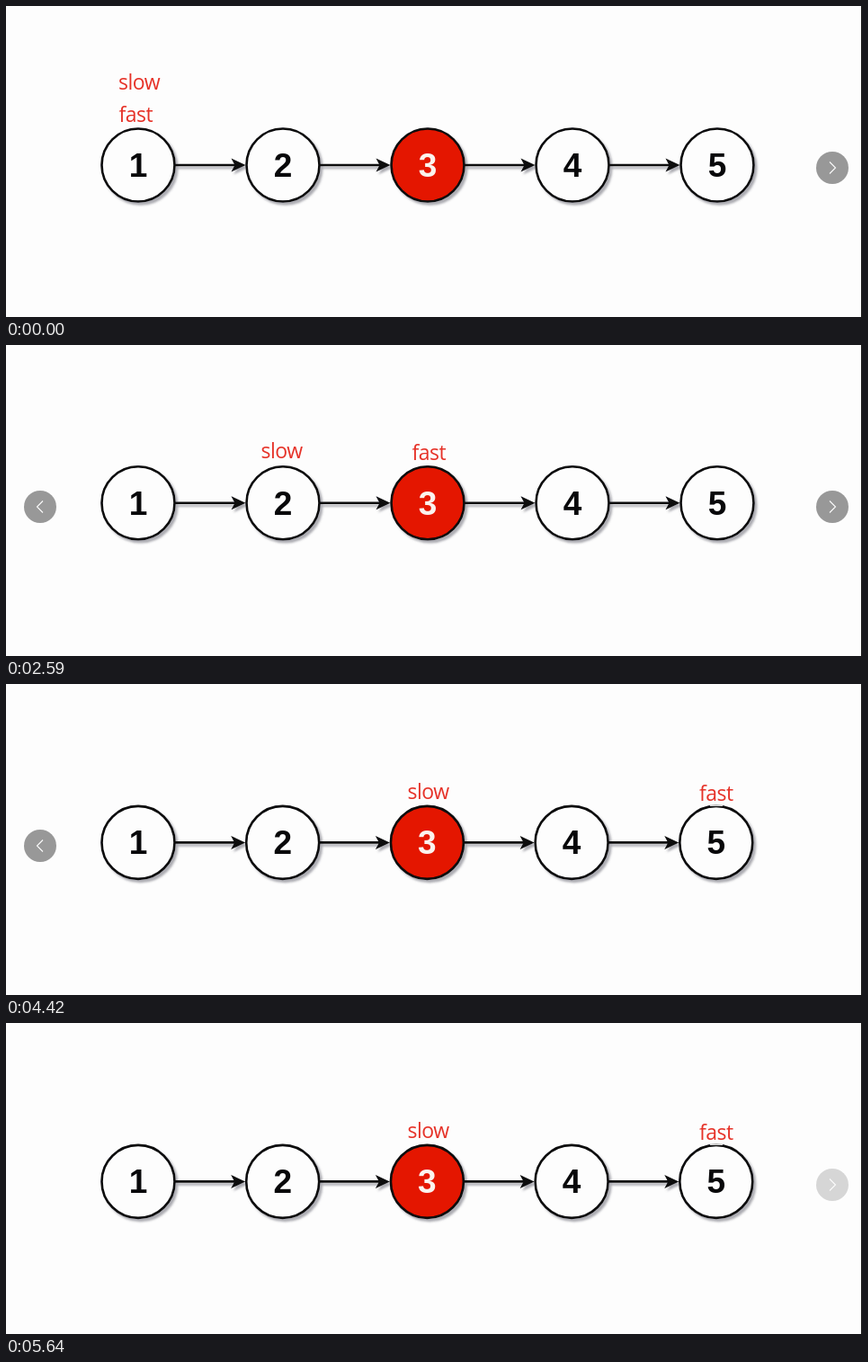
Write an HTML page that moves like this. It is 952 by 346 pixels and loops after 6.36 s.

```html
<!DOCTYPE html>
<html lang="en">
<head>
<meta charset="utf-8">
<style>
  html, body { margin: 0; width: 100%; height: 100%; overflow: hidden; background: #fdfdfd; }
  svg { display: block; }
  .num { font: bold 37px "Liberation Sans", Arial, sans-serif; text-anchor: middle; }
  .label { font: 23px "Open Sans", "Noto Sans", sans-serif; letter-spacing: -.5px; fill: #e63228; }
</style>
</head>
<body>
<svg width="952" height="346" viewBox="0 0 952 346">
  <defs>
    <filter id="shadow" filterUnits="userSpaceOnUse" x="90" y="120" width="760" height="115">
      <feDropShadow dx="2.7" dy="3" stdDeviation="1" flood-color="#5c5c68" flood-opacity=".5"/>
    </filter>
  </defs>
  <g id="slides"></g>
  <g id="buttons"></g>
  <path d="M951.5 0V346" stroke="#111"/>
</svg>
<script>
const LOOP = 6360, R = 40.5, INK = '#08080a';

// Each slide: centre line, node spacing, and labels as [text, x, baseline].
const slides = [
  { y: 177, gap: 161, labels: [['slow', 125, 93], ['fast', 125.5, 129]] },
  { y: 175.7, gap: 161, labels: [['slow', 283.5, 126], ['fast', 451.5, 128]] },
  { y: 176.4, gap: 160.7, labels: [['slow', 446.5, 127.5], ['fast', 771, 130]], notch: true }
];

// Start time, slide, opacity of the left and right buttons.
const steps = [
  [0, 0, 0, 1],
  [2070, 1, 1, 1],
  [4300, 2, 1, 0],
  [5590, 2, .38, .2],
  [5640, 2, 0, .38]
];

function drawNode(x, y, n) {
  return `<circle cx="${x}" cy="${y}" r="${R}" fill="${n === 3 ? '#e41400' : '#fdfdfd'}"
    stroke="${INK}" stroke-width="2.6"/>`;
}

function drawArrow(x, y, gap) {
  const tip = x + gap - R - 1;
  return `<path d="M${x + R} ${y}H${tip - 10}" stroke="${INK}" stroke-width="2.6"/>
    <path d="M${tip} ${y}l-16 -7.5 4 7.5 -4 7.5z" fill="${INK}"/>`;
}

function drawSlide({ y, gap, labels, notch }) {
  let shapes = '', text = '';
  for (let n = 1; n <= 5; n++) {
    const x = 147 + (n - 1) * gap;
    shapes += drawNode(x, y, n) + (n < 5 ? drawArrow(x, y, gap) : '');
    text += `<text class="num" x="${x}" y="${y + 13}" fill="${n === 3 ? '#fbf3ee' : INK}">${n}</text>`;
  }
  for (const [word, x, base] of labels)
    text += `<text class="label" x="${x}" y="${base}">${word}</text>`;
  // The last label's box covers the top edge of its node.
  const cover = notch ? '<path d="M783 135.2h14" stroke="#d4d4d4" stroke-width="1.6"/>' : '';
  return `<g visibility="hidden"><g filter="url(#shadow)">${shapes}</g>${cover}${text}</g>`;
}

function drawButton(x, dir) {
  return `<g transform="translate(${x} 180)"><circle r="18" fill="#989898"/>
    <path d="M${-3 * dir} -6.5L${3.5 * dir} 0L${-3 * dir} 6.5" fill="none" stroke="#fafafa" stroke-width="1.1"/></g>`;
}

const slideBox = document.getElementById('slides');
const buttonBox = document.getElementById('buttons');
slideBox.innerHTML = slides.map(drawSlide).join('');
buttonBox.innerHTML = drawButton(38, -1) + drawButton(919, 1);

function render(now) {
  const t = now % LOOP;
  const [, slide, left, right] = steps.findLast(s => t >= s[0]);
  [...slideBox.children].forEach((g, i) => g.setAttribute('visibility', i === slide ? 'visible' : 'hidden'));
  buttonBox.children[0].setAttribute('opacity', left);
  buttonBox.children[1].setAttribute('opacity', right);
}

const start = performance.now();
function tick() {
  render(performance.now() - start);
  requestAnimationFrame(tick);
}
tick();
</script>
</body>
</html>
```
